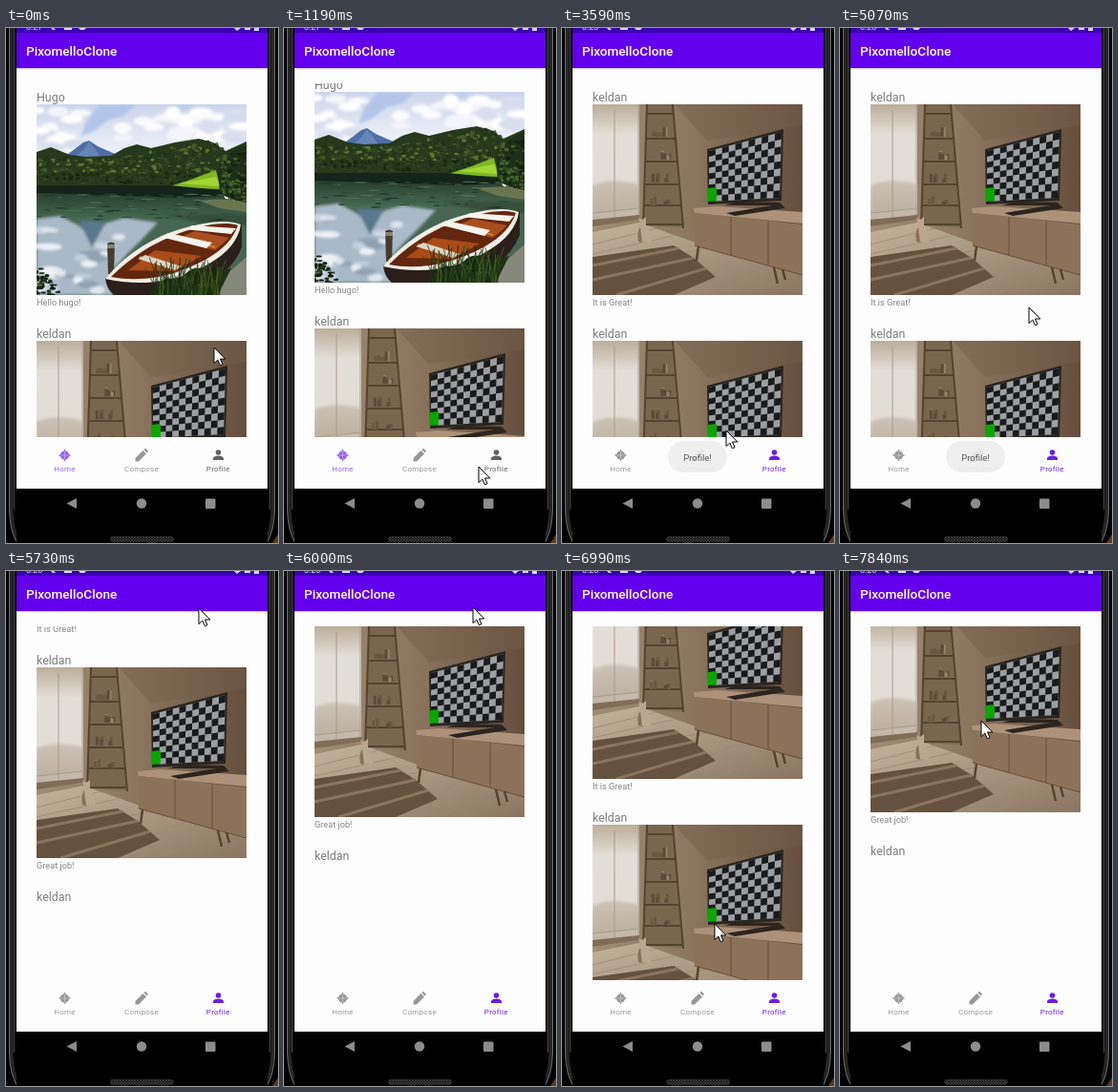
Recreate the animation shown at these times as an HTML page. Size 285 px wide and 540 px high, loop 8 s.

```html
<!DOCTYPE html>
<html lang="en">
<head>
<meta charset="utf-8">
<title>Photo feed</title>
<style>
  html, body { margin: 0; width: 100%; height: 100%; overflow: hidden; background: #000; }
  svg { display: block; width: 285px; height: 540px; }
  text { font-family: Roboto, sans-serif; }
  .name { font-size: 12.4px; fill: #7c7c7c; }
  .caption { font-size: 9.2px; fill: #858585; }
  .tab { color: #979797; font-size: 8px; letter-spacing: .25px; text-anchor: middle; fill: currentColor; }
  #homeTab.on { color: #9662f3; }
  #profileTab { color: #626262; }
  #profileTab.on { color: #6a1cf0; }
</style>
</head>
<body>
<svg viewBox="0 0 285 540">
  <defs>
    <linearGradient id="sky" x2="0" y2="1">
      <stop stop-color="#ccd5ea"/><stop offset=".6" stop-color="#f0f2f9"/>
    </linearGradient>
    <linearGradient id="lake" x2="0" y2="1">
      <stop stop-color="#1d3423"/><stop offset=".3" stop-color="#456650"/><stop offset="1" stop-color="#4c6558"/>
    </linearGradient>
    <linearGradient id="wall">
      <stop stop-color="#a08d76"/><stop offset=".5" stop-color="#8a745e"/><stop offset="1" stop-color="#654e3c"/>
    </linearGradient>
    <linearGradient id="pane" x2="0" y2="1">
      <stop stop-color="#bbae9b"/><stop offset=".25" stop-color="#e3ded7"/><stop offset=".65" stop-color="#e2ddd5"/><stop offset="1" stop-color="#b9ac9b"/>
    </linearGradient>
    <linearGradient id="floor" x2="1" y2="1">
      <stop stop-color="#c3b39d"/><stop offset="1" stop-color="#8b7561"/>
    </linearGradient>
    <linearGradient id="shade" x2="0" y2="1">
      <stop stop-color="#c9c6d0"/><stop offset="1" stop-color="#fdfdfd"/>
    </linearGradient>
    <filter id="soft" x="-20%" y="-20%" width="140%" height="140%"><feGaussianBlur stdDeviation="1.4"/></filter>
    <clipPath id="photoBox"><path d="M0 0H220V200H0Z"/></clipPath>
    <clipPath id="listBox"><path d="M31 58H253V429H31Z"/></clipPath>
    <pattern id="mesh" width="3" height="3" patternUnits="userSpaceOnUse">
      <path d="M0 0H3V3H0Z" fill="#161616"/><path d="M0 0L3 3M3 0L0 3" stroke="#484848" stroke-width=".7"/>
    </pattern>

    <g id="lakePhoto" clip-path="url(#photoBox)">
      <path d="M0 0H220V90H0Z" fill="url(#sky)"/>
      <g filter="url(#soft)">
        <path d="M66 0H104L92 12 76 16 60 28 46 34 52 18Z" fill="#b3c6ea"/>
        <path d="M140 0H168L150 9Z" fill="#c0cfec"/>
        <g id="clouds"></g>
      </g>
      <path d="M26 57L40 47 49 40 55 38 64 44 80 51 96 58Z" fill="#4f6ea3"/>
      <path d="M55 39L62 48 68 57H38L49 48Z" fill="#6685b8"/>
      <path d="M0 50L15 45 35 53 52 55 78 54 92 46 105 42 120 46 145 40 170 36 185 40 198 49 220 39V92H0Z" fill="#26391c"/>
      <g id="trees"></g>
      <path d="M136 87Q160 80 172 75L188 69 193 89Z" fill="#7fb822"/>
      <path d="M150 83L188 76 192 86Z" fill="#a2d634"/>
      <path d="M190 68Q200 48 220 43V106L192 94Z" fill="#1e3019"/>
      <g id="bush"></g>
      <path d="M0 86Q80 83 135 86L192 90 198 99 220 104V200H0Z" fill="url(#lake)"/>
      <path d="M0 85H140L192 90 198 96 150 98 0 93Z" fill="#14241a"/>
      <g filter="url(#soft)">
        <path d="M0 120L25 117 44 127 58 140 74 124 92 119 127 124 110 142 94 158 78 176 84 200H0Z" fill="#a9b9c8"/>
        <g id="mirrored"></g>
        <path d="M44 122L58 150 73 123Z" fill="#58788d"/>
        <path d="M130 115H220V127H180Z" fill="#36503a"/>
      </g>
      <g id="ripples"></g>
      <path d="M170 101Q198 97 220 103V113L192 109Z" fill="#6a7550"/>
      <path d="M175 200L196 181 220 160V200Z" fill="#85877a"/>
      <g id="shore"></g>
      <path d="M74 146Q78 143 82 146L81 178H75Z" fill="#463d32"/>
      <path d="M74 147H82V151H74Z" fill="#8a8275"/>
      <path d="M72 182Q73 194 82 201H160Q204 179 215 150V125Z" fill="#2c1f1b"/>
      <path d="M72 183C88 164 111 144 147 132 180 122 200 121 214 126 212 142 200 156 181 167 146 188 108 191 72 183Z" fill="#f0ede5"/>
      <path d="M78 181C94 165 117 147 150 135 179 125 199 123 211 127 206 141 196 152 177 163 143 181 109 187 78 181Z" fill="#63270f"/>
      <path d="M96 174L124 153 173 159 145 175Z" fill="#a94c17"/>
      <path d="M144 142L166 133 202 140 187 153Z" fill="#a94f1e"/>
      <path d="M108 160L143 171M149 138L187 150" stroke="#df862f" stroke-width="1.6"/>
      <path d="M130 139L138 135 184 145 178 151ZM155 131L163 127 209 130 204 136Z" fill="#f5f3ed"/>
      <path d="M106 162L114 158 152 170 145 174Z" fill="#ddd3c2"/>
      <path d="M118 200Q132 176 149 185 167 163 180 177L204 172 190 200Z" fill="#1e3214"/>
      <g id="grass" fill="none" stroke-width=".8"></g>
    </g>

    <g id="roomPhoto" clip-path="url(#photoBox)">
      <path d="M0 0H220V200H0Z" fill="url(#wall)"/>
      <path d="M86 0H220V22L120 38Z" fill="#735e4b" opacity=".45"/>
      <path d="M0 0H49V121L0 127Z" fill="url(#pane)"/>
      <path d="M0 85Q20 76 48 84V110L0 115Z" fill="#b7aa9a" opacity=".55" filter="url(#soft)"/>
      <path d="M23 6V120M48 0V120M0 114L48 109" stroke="#a99c8b" fill="none"/>
      <path d="M0 121L49 116V121L0 128Z" fill="#806d58"/>
      <path d="M0 134L49 124 108 145 220 177V200H0Z" fill="url(#floor)"/>
      <path d="M0 147L67 130M0 157L88 137M80 158L130 150M104 184L160 160M135 197L184 170" stroke="#9d8971" stroke-width=".8"/>
      <path d="M57 0H84L96 129 53 127Z" fill="#79664f"/>
      <path d="M57 0L53 128M84 0L95 130M57 10H84M56 36H87M55 60H89M54 84H91M54 106H93M53 126H95" stroke="#54432f" stroke-width="2" fill="none"/>
      <g id="books"></g>
      <path d="M0 160L85 148 106 161 129 181 85 200H0Z" fill="#66513f"/>
      <path d="M0 169L90 151M0 184L106 161M25 200L119 172" stroke="#8b745e" stroke-width="3"/>
      <path d="M48 144Q43 128 50 126L48 119 52 121 56 118V127Q63 138 61 145Z" fill="#bba78f"/>
      <path d="M48 144Q46 133 50 129L52 145Z" fill="#87715b"/>
      <path d="M106 109L130 107 220 113V125L107 114Z" fill="#ad9279"/>
      <path d="M107 114L220 126V179L196 172 107 148Z" fill="#8d725a"/>
      <path d="M145 118V158M184 122V169M107 148L220 179" stroke="#654e3b" fill="none"/>
      <path d="M111 149L109 164M190 171L194 188M199 173L202 184" stroke="#58432f" stroke-width="2.5"/>
      <path d="M138 106L151 102 196 103 202 109 149 117 140 114 189 106Z" fill="#2b241f"/>
      <path d="M120 47L200 26 198 101 121 105Z" fill="#29251f"/>
      <path d="M122 49L198 29 196 98 122 102Z" fill="#9c9fa2"/>
      <path id="checks" fill="#191a1c"/>
      <path d="M121 88L130 87V101L121 102Z" fill="#08a700"/>
    </g>

    <path id="arrow" d="M0 0V16.6L3.8 13 6.4 18.8 9 17.7 6.5 12H11.8Z" fill="#fff" stroke="#000" stroke-linejoin="round"/>
  </defs>

  <path d="M0 0H285V540H0Z"/>
  <g fill="none">
    <path d="M5.5 0V505Q6 526 13 540M279.5 0V505Q279 526 272 540" stroke="#262626" stroke-width="4"/>
    <path d="M3.5 0V505Q4 528 12 540M281.5 0V505Q281 528 273 540" stroke="#6d6d6d"/>
    <path d="M8.5 0V505M276.5 0V505" stroke="#444"/>
  </g>
  <path d="M285 531V540H279Z" fill="#5c3a1d"/>
  <path d="M11 0H274V483H11Z" fill="#fdfdfd"/>
  <path d="M11 42H274V44H11Z" fill="url(#shade)"/>
  <path d="M11 0H274V42H11Z" fill="#6200ee"/>
  <path d="M11 0H274V5H11Z" fill="#3b00b0"/>
  <g fill="#ddd3f5">
    <text id="clock" x="21" y="2" font-size="9"></text>
    <path d="M47 0H50L52 2H49ZM61 0H69V2H61ZM76 0H84L82 2H78ZM239 0H246L242 3ZM250 0H256V2H250ZM260 0H265V3H260Z"/>
  </g>
  <text x="21" y="29" font-size="13.6" font-weight="500" fill="#fff">PixomelloClone</text>

  <g clip-path="url(#listBox)">
    <g id="home"></g>
    <g id="profile"></g>
  </g>

  <g class="tab" id="homeTab">
    <circle cx="61.5" cy="448" r="4.6"/>
    <path d="M61.5 442V454M55.5 448H67.5" stroke="currentColor" stroke-width="1.3"/>
    <path d="M61.5 444V452M57.5 448H65.5" stroke="#fff" stroke-width=".6" opacity=".6"/>
    <text x="61.5" y="465">Home</text>
  </g>
  <g class="tab">
    <path d="M135.5 454.5V451L143.5 443 147 446.5 139 454.5ZM144.3 442.2L146 440.8 149 443.8 147.7 445.6Z"/>
    <text x="142" y="465">Compose</text>
  </g>
  <g class="tab" id="profileTab">
    <circle cx="222.5" cy="445" r="2.8"/>
    <path d="M217 453V451Q218 448.5 222.5 448.5T228 451V453Z"/>
    <text x="222.3" y="465">Profile</text>
  </g>

  <g id="toast">
    <rect x="111" y="433" width="62" height="33" rx="16.5" fill="#eee"/>
    <text x="142" y="453.5" font-size="9.5" text-anchor="middle" fill="#4b4b4b">Profile!</text>
  </g>

  <path d="M11 483H274V540H11Z"/>
  <g fill="#8c8c8c">
    <path d="M63.5 498.5L74 493V504Z"/><circle cx="142" cy="498.5" r="5.2"/><rect x="209" y="493.5" width="10.5" height="10.5" rx="1"/>
  </g>
  <rect x="109" y="533" width="67" height="6" rx="3" fill="url(#mesh)"/>
  <use id="cursor" href="#arrow"/>
</svg>
<script>
const $ = id => document.getElementById(id);
const LOOP = 8000;

let seed = 7;
const rand = (lo, hi) => {
  seed = (seed * 16807) % 2147483647;
  return lo + (hi - lo) * seed / 2147483647;
};
const pick = list => list[Math.floor(rand(0, list.length))];
const repeat = (n, make) => Array.from({ length: n }, (_, i) => make(i)).join('');
const blob = (x, y, rx, ry, fill) =>
  `<ellipse cx="${x.toFixed(1)}" cy="${y.toFixed(1)}" rx="${rx.toFixed(1)}" ry="${ry.toFixed(1)}" fill="${fill}"/>`;

// Photo textures
const cloudTones = ['#fff', '#fbfbfe', '#f4f5fb', '#d9dfee'];
$('clouds').innerHTML =
  repeat(26, () => blob(rand(90, 220), rand(4, 38), rand(7, 18), rand(3, 7), pick(cloudTones))) +
  repeat(18, () => blob(rand(0, 50), rand(0, 46), rand(6, 14), rand(3, 7), pick(cloudTones)));
$('trees').innerHTML = repeat(420, () => {
  const x = rand(0, 195);
  const top = x < 80 ? 57 : 57 - (x - 80) * .18;
  const y = rand(top, 83);
  const tones = y < 72 ? ['#213419', '#435a25', '#5b752c', '#304820'] : ['#16270f', '#20341a', '#2f451d'];
  return blob(x, y, rand(1, 3), rand(.8, 2.2), pick(tones));
});
$('bush').innerHTML = repeat(90, () =>
  blob(rand(194, 220), rand(52, 101), rand(.8, 3), rand(.8, 2.2), pick(['#304b20', '#48642a', '#13220f'])));
$('mirrored').innerHTML = repeat(26, () => {
  const y = rand(130, 197);
  return blob(rand(0, 92 - (y - 130) * .4), y, rand(5, 13), rand(2, 5), pick(['#eef1f6', '#dfe6ee', '#c3d0dd', '#8ea2b3']));
});
$('ripples').innerHTML = repeat(70, () =>
  blob(rand(0, 200), rand(94, 122), rand(2, 9), .6, pick(['#2b4a35', '#4d6f53', '#1f3827'])));
$('shore').innerHTML = repeat(45, () => {
  const y = rand(172, 200);
  return blob(rand(0, (y - 166) * .9), y, rand(1, 3.5), rand(.7, 2), pick(['#1c2f18', '#33482a', '#11200f']));
});
$('grass').innerHTML = repeat(110, () => {
  const x = rand(122, 192);
  return `<path d="M${x} 200Q${x + rand(-4, 4)} 185 ${x + rand(-10, 12)} ${rand(160, 190)}" stroke="${pick(['#14260f', '#263d18', '#4c6628'])}"/>`;
});
$('books').innerHTML = repeat(24, i => {
  const row = i % 4;
  const h = rand(4, 10);
  return `<rect x="${rand(60, 80)}" y="${34 + row * 24 - h}" width="3" height="${h}" fill="${pick(['#5c4b3a', '#95826a', '#69573f'])}"/>`;
});

// Checkerboard seen at an angle
const COLS = 11, ROWS = 9;
const corner = (c, r) => {
  const u = c / COLS, v = r / ROWS;
  const top = 49 - 20 * u, bottom = 102 - 4 * u;
  return `${(122 + (76 - 2 * v) * u).toFixed(1)} ${(top + (bottom - top) * v).toFixed(1)}`;
};
let checks = '';
for (let r = 0; r < ROWS; r++)
  for (let c = r % 2; c < COLS; c += 2)
    checks += `M${corner(c, r)}L${corner(c + 1, r)} ${corner(c + 1, r + 1)} ${corner(c, r + 1)}Z`;
$('checks').setAttribute('d', checks);

// Posts
const post = ([name, photo, caption], i) => `<g transform="translate(32 ${80 + i * 248})">
  <text class="name" y="-3.5">${name}</text>
  ${photo ? `<use href="#${photo}"/><text class="caption" y="211">${caption}</text>` : ''}</g>`;
$('home').innerHTML = [
  ['Hugo', 'lakePhoto', 'Hello hugo!'],
  ['keldan', 'roomPhoto', 'It is Great!']
].map(post).join('');
$('profile').innerHTML = [
  ['keldan', 'roomPhoto', 'It is Great!'],
  ['keldan', 'roomPhoto', 'Great job!'],
  ['keldan']
].map(post).join('');

// Bursts of screen updates: start, end, number of updates
const bursts = [
  [140, 1070, 8], [1190, 1430, 3], [1700, 2280, 5], [2680, 3710, 7], [3830, 3980, 2],
  [4260, 5220, 8], [5340, 6270, 8], [6420, 6990, 5], [7300, 7840, 5]
];
const cursorPath = [
  [0, 218, 335], [140, 218, 333], [400, 216, 322], [1070, 204, 455], [1190, 204, 460],
  [1430, 215, 519], [1700, 216, 510], [2280, 222, 455], [3200, 222, 455], [3710, 146, 405],
  [3830, 141, 385], [3980, 130, 340], [4260, 132, 335], [5060, 198, 294], [5220, 198, 290],
  [5340, 199, 265], [5730, 202, 39], [6270, 194, 38], [6420, 180, 20], [6560, 175, 149],
  [6990, 160, 370], [7300, 158, 345], [7840, 148, 157]
];
const homeScroll = [[0, 0], [140, 2], [400, 13]];
const profileScroll = [
  [5340, 0], [5730, 226], [6000, 270], [6270, 283], [6560, 283], [6990, 62], [7300, 87], [7840, 275]
];

function snap(t) {
  let shown = 0;
  for (const [start, end, count] of bursts) {
    if (t < start) break;
    const gap = (end - start) / (count - 1);
    shown = Math.min(end, start + Math.floor((t - start) / gap + .2) * gap);
  }
  return shown;
}

function at(keys, t) {
  const next = keys.findIndex(k => k[0] > t);
  if (next === 0) return keys[0].slice(1);
  if (next < 0) return keys[keys.length - 1].slice(1);
  const a = keys[next - 1], b = keys[next];
  const p = (t - a[0]) / (b[0] - a[0]);
  return a.slice(1).map((v, i) => v + (b[i + 1] - v) * p);
}

const move = (id, x, y) => $(id).setAttribute('transform', `translate(${Math.round(x)} ${Math.round(y)})`);
const show = (id, on) => $(id).setAttribute('visibility', on ? 'visible' : 'hidden');

function render(now) {
  const t = snap(now % LOOP);
  const onProfile = t >= 2840, loaded = t >= 3500;
  move('cursor', ...at(cursorPath, t));
  move('home', 0, -at(homeScroll, t)[0]);
  move('profile', 0, -at(profileScroll, t)[0]);
  show('home', !loaded);
  show('profile', loaded);
  $('homeTab').classList.toggle('on', !onProfile);
  $('profileTab').classList.toggle('on', onProfile);
  $('toast').setAttribute('opacity', t < 3350 || t >= 5340 ? 0 : t >= 5200 ? .45 : .9);
  $('clock').textContent = loaded ? '8:28' : '8:27';
  requestAnimationFrame(render);
}
render(0);
</script>
</body>
</html>
```
